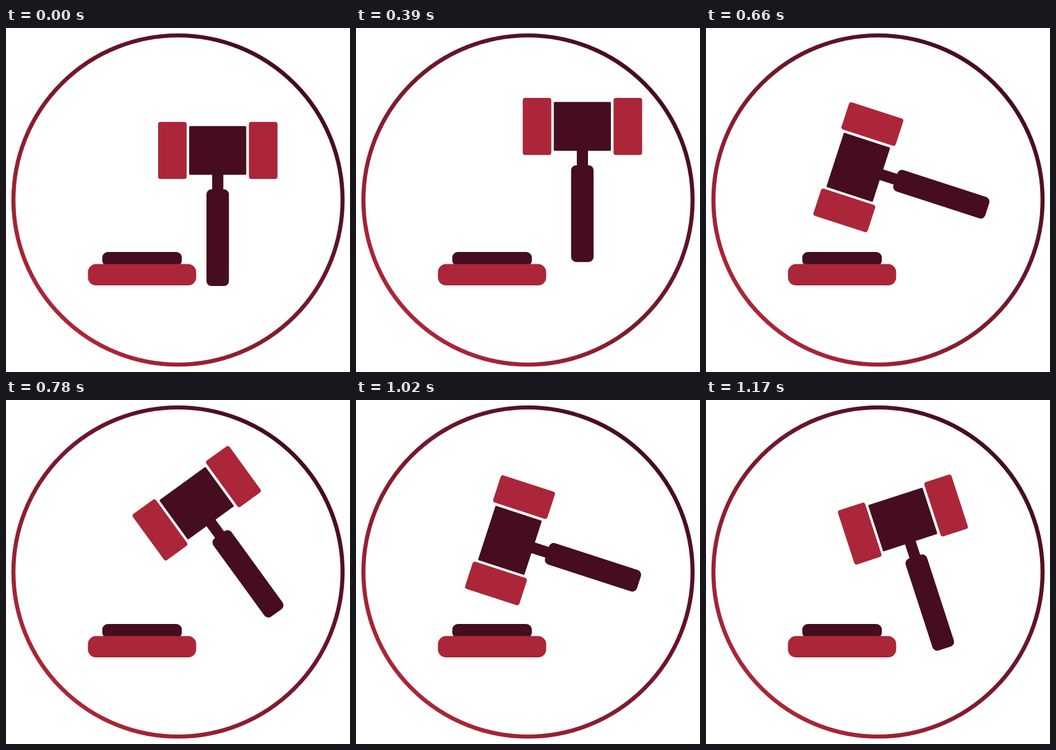
An HTML page with a canvas that plays this animation: 556 px wide and 556 px high, repeating every 1200 ms.

```html
<!DOCTYPE html>
<html lang="en">
<head>
<meta charset="utf-8">
<title>Gavel</title>
<style>
html, body { margin: 0; width: 100%; height: 100%; overflow: hidden; background: #fff; }
canvas { display: block; width: 556px; height: 556px; }
</style>
</head>
<body>
<canvas id="stage" width="556" height="556"></canvas>
<script>
const ctx = document.getElementById('stage').getContext('2d');
const RED = '#ab2638', DARK = '#450d1f';
const LOOP = 1200, STEP = 30;
const PIVOT = [342.3, 284.5];

// Gavel offsets from its resting place
const REST = [0, 0], RAISED = [32, -43], RAISED_AGAIN = [34, -43], STRIKE = [-34, -18];

// Each move: start, end, path (from, bend, to), turn in degrees (from, to)
const moves = [
  { t0: 150, t1: 450, path: [REST, [10, -35.3], RAISED], turn: [0, 0] },
  { t0: 450, t1: 600, path: [RAISED, [30.7, -55.4], STRIKE], turn: [0, -90] },
  { t0: 600, t1: 900, path: [STRIKE, [21, -61], RAISED_AGAIN], turn: [-90, 0] },
  { t0: 900, t1: 1050, path: [RAISED_AGAIN, [29.4, -55.6], STRIKE], turn: [0, -90] },
  { t0: 1050, t1: 1200, path: [STRIKE, [12.7, -25.6], REST], turn: [-90, 0] }
];

const bezier = ([a, b, c], u) =>
  a.map((p, i) => (1 - u) ** 2 * p + 2 * u * (1 - u) * b[i] + u * u * c[i]);

function pose(t) {
  const m = moves.find(m => t >= m.t0 && t < m.t1);
  if (!m) return { x: 0, y: 0, deg: 0 };
  const u = (t - m.t0) / (m.t1 - m.t0);
  const [x, y] = bezier(m.path, u);
  return { x, y, deg: m.turn[0] + (m.turn[1] - m.turn[0]) * u };
}

function box(color, left, top, right, bottom, r) {
  ctx.fillStyle = color;
  ctx.beginPath();
  ctx.roundRect(left, top, right - left, bottom - top, r);
  ctx.fill();
}

function drawRing() {
  const g = ctx.createLinearGradient(90, 466, 466, 90);
  g.addColorStop(0, RED);
  g.addColorStop(1, DARK);
  ctx.strokeStyle = g;
  ctx.lineWidth = 6.6;
  ctx.beginPath();
  ctx.arc(278, 278, 266, 0, Math.PI * 2);
  ctx.stroke();
}

function drawBlock() {
  box(DARK, 155.6, 362, 284.2, 385, 9);
  box(RED, 132.4, 381.6, 307.4, 416, 13);
}

function drawGavel({ x, y, deg }) {
  ctx.save();
  ctx.translate(PIVOT[0] + x, PIVOT[1] + y);
  ctx.rotate(deg * Math.PI / 180);
  ctx.translate(-PIVOT[0], -PIVOT[1]);
  box(DARK, 333.2, 234, 351.3, 264, 0);
  box(DARK, 324, 260.8, 360.3, 417, 8);
  box(DARK, 296, 158.4, 388.3, 237.2, 1.5);
  box(RED, 245.8, 151.8, 292, 244, 4);
  box(RED, 392.6, 151.8, 438.8, 244, 4);
  ctx.restore();
}

const start = performance.now();

function frame() {
  const t = (performance.now() - start) % LOOP;
  ctx.fillStyle = '#fff';
  ctx.fillRect(0, 0, 556, 556);
  drawRing();
  drawBlock();
  drawGavel(pose(Math.floor(t / STEP) * STEP));
  requestAnimationFrame(frame);
}
frame();
</script>
</body>
</html>
```
